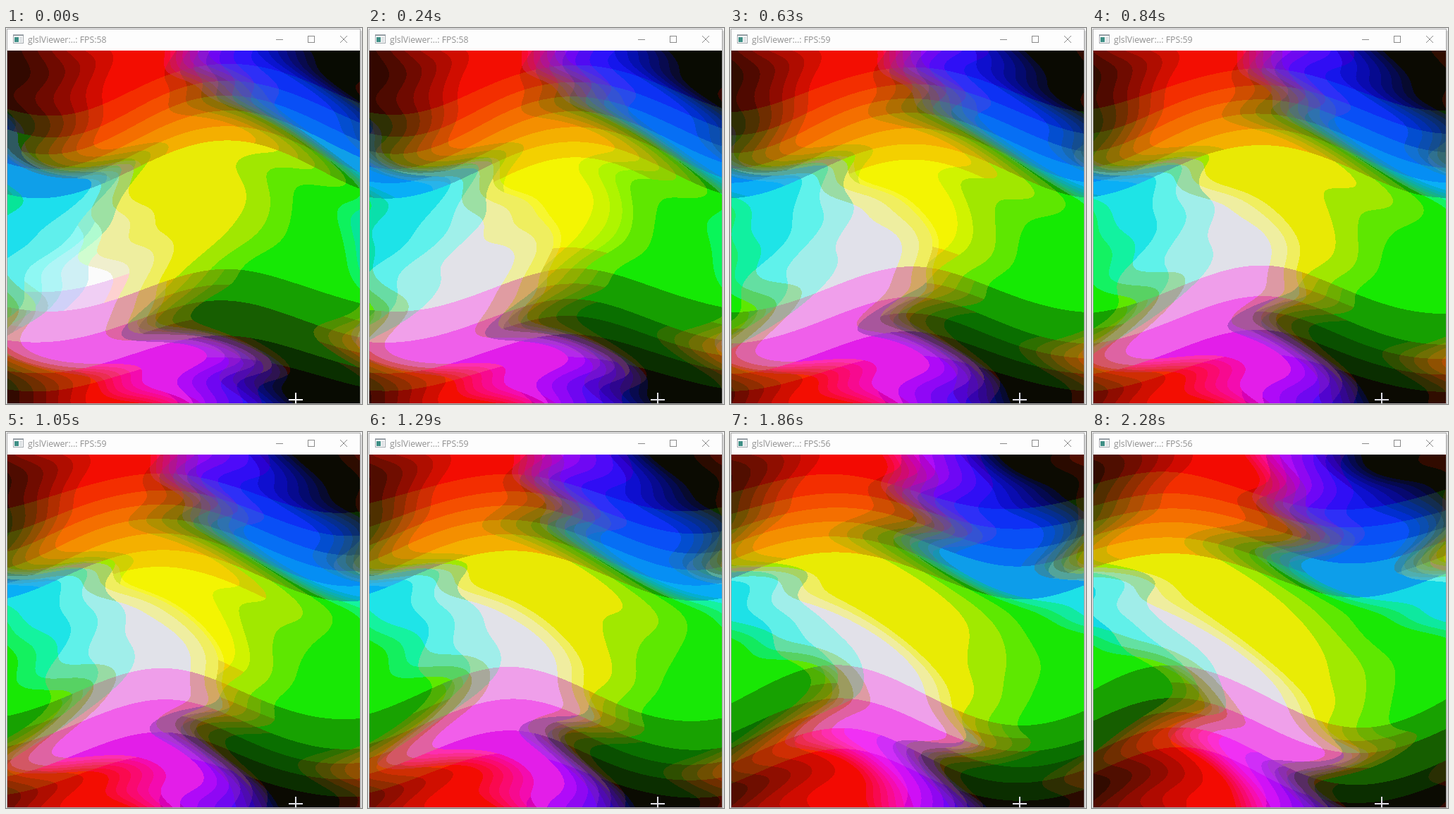
Animation, 505 px wide and 533 px high, one loop 2.38 s. Source, as an HTML page with a canvas:

```html
<!DOCTYPE html>
<html lang="en">
<head>
<meta charset="utf-8">
<title>glslViewer</title>
<style>
  html, body { margin: 0; width: 100%; height: 100%; overflow: hidden; background: #fff; }
  .stage { position: relative; width: 505px; height: 533px; overflow: hidden; background: #f3f3f3; }
  .window { position: absolute; left: 1px; top: 1px; width: 500px; height: 530px; border: 1px solid #a9a9a9; background: #fdfdfd; }
  .shade { position: absolute; left: 503px; top: 4px; width: 2px; height: 529px; background: linear-gradient(90deg, #c9c9c9, #e2e2e2); }
  .title { position: absolute; left: 31px; top: 8px; font: 12.3px/17px "Open Sans", "Noto Sans", sans-serif; color: #8f8f8f; white-space: pre; }
  svg, canvas { position: absolute; left: 0; top: 0; }
  canvas { left: 2px; top: 32px; }
</style>
</head>
<body>
<div class="stage">
  <div class="shade"></div>
  <div class="window"></div>
  <svg width="505" height="32" fill="none" stroke="#8a8a8a" shape-rendering="crispEdges">
    <rect x="10.5" y="9.5" width="14" height="12" fill="#fff" stroke="#a3a9ae"/>
    <path d="M10 10.5H25" stroke="#8b939b"/>
    <rect x="12" y="13" width="6" height="7" fill="#3f8f86" stroke="none"/>
    <path d="M19 13.5h4M19 15.5h4M19 17.5h4M19 19.5h4" stroke="#c4cbd0"/>
    <path d="M383 16.5h10M428.5 11.5h9v9h-9z"/>
    <path d="M474 11l10 10M484 11l-10 10" shape-rendering="auto"/>
  </svg>
  <div class="title">glslViewer:..: FPS:<span id="fps">58</span></div>
  <canvas id="view" width="500" height="500"></canvas>
</div>
<script>
const SIZE = 500, LOOP = 2380, MAX_COLORS = 256;
// The shader clock runs a little ahead: 62.5 ms ticks are shown for 60 ms
const START = 0.35, RATE = 62.5 / 60;
const times = [0, 90, 150, 240, 300, 390, 450, 510, 570, 630, 690, 780, 840, 930, 990, 1050,
  1110, 1200, 1290, 1380, 1440, 1500, 1560, 1650, 1740, 1800, 1860, 1950, 2040, 2100, 2190, 2280];
const titleChanges = { 0: 58, 450: 59, 1500: 56 };

const ctx = document.getElementById('view').getContext('2d');
const fpsLabel = document.getElementById('fps');

// Sine lookup keeps the per-pixel loop fast
const STEPS = 16384, SCALE = STEPS / (2 * Math.PI);
const table = Float64Array.from({ length: STEPS }, (_, i) => Math.sin((i + 0.5) / SCALE));
const sin = a => table[(a * SCALE) & (STEPS - 1)];

const keyOf = (r, g, b) => (r >> 4) << 8 | (g >> 4) << 4 | b >> 4;
const prefix = (key, depth) => key & (0x111 * (0xF << (4 - depth) & 0xF));

function onCursor(x, y) {
  return (y >= 494 && y < 496 && x >= 399 && x < 419) || (x >= 408 && x < 410 && y >= 485);
}

function warp(col, row, t) {
  let x = 6 * (col + 0.5) / SIZE, y = 6 * (SIZE - row - 0.5) / SIZE;
  for (let i = 1; i < 8; i++) {
    const phase = t + 0.3 * i;
    const dx = 0.7 / i * sin(i * y + phase) + 0.8;
    y += 0.4 / i * sin(x + phase) + 1.6;
    x += dx;
  }
  return [x, y];
}

// Octree reduction: the newest branches of the deepest level merge first
function chooseDepths(order) {
  const depth = new Map(order.map(k => [k, 4]));
  let leaves = order.length;
  for (let d = 3; d > 0 && leaves > MAX_COLORS; d--) {
    const nodes = new Map();
    for (const k of order) {
      const p = prefix(k, d);
      if (!nodes.has(p)) nodes.set(p, []);
      nodes.get(p).push(k);
    }
    for (const keys of [...nodes.values()].reverse()) {
      if (leaves <= MAX_COLORS) break;
      leaves -= new Set(keys.map(k => prefix(k, d + 1))).size - 1;
      keys.forEach(k => depth.set(k, d));
    }
  }
  return depth;
}

function buildPalette(order, sums) {
  const depth = chooseDepths(order), groups = new Map();
  const groupId = k => depth.get(k) << 12 | prefix(k, depth.get(k));
  for (const k of order) {
    const id = groupId(k);
    if (!groups.has(id)) groups.set(id, [0, 0, 0, 0]);
    const total = groups.get(id);
    for (let c = 0; c < 4; c++) total[c] += sums[k * 4 + c];
  }
  const palette = new Uint32Array(4096);
  for (const k of order) {
    const [r, g, b, n] = groups.get(groupId(k));
    palette[k] = (255 << 24 | (b / n) << 16 | (g / n) << 8 | r / n) >>> 0;
  }
  return palette;
}

function render(ms) {
  const t = START + RATE * ms / 1000;
  const keys = new Uint16Array(SIZE * SIZE), sums = new Float64Array(4096 * 4), order = [];
  const add = (r, g, b, n) => {
    const k = keyOf(r, g, b), s = k * 4;
    if (!sums[s + 3]) order.push(k);
    sums[s] += r * n;
    sums[s + 1] += g * n;
    sums[s + 2] += b * n;
    sums[s + 3] += n;
    return k;
  };
  // The title bar shares the palette whenever its text changes
  if (ms in titleChanges) {
    add(253, 253, 253, 9000);
    for (let grey = 112; grey < 240; grey += 32) {
      add(grey, grey, grey, 60);
      add(grey - 40, grey, grey, 10);
    }
  }
  for (let row = 0, i = 0; row < SIZE; row++) {
    for (let col = 0; col < SIZE; col++, i++) {
      if (onCursor(col, row)) {
        keys[i] = add(255, 255, 255, 1);
        continue;
      }
      const [x, y] = warp(col, row, t);
      const r = 127.5 * sin(x) + 128 | 0;
      const g = 127.5 * sin(y) + 128 | 0;
      const b = Math.max(0, 255 * sin(x + y) + 0.5) | 0;
      keys[i] = add(r, g, b, 1);
    }
  }
  const palette = buildPalette(order, sums);
  const image = ctx.createImageData(SIZE, SIZE);
  const out = new Uint32Array(image.data.buffer);
  for (let i = 0; i < out.length; i++) out[i] = palette[keys[i]];
  return image;
}

const cache = [];
let shown = -1;

function draw(now) {
  const ms = now % LOOP;
  const step = times.findLastIndex(start => start <= ms);
  if (step !== shown) {
    shown = step;
    cache[step] ||= render(times[step]);
    ctx.putImageData(cache[step], 0, 0);
    const changed = Object.keys(titleChanges).filter(at => at <= ms).pop();
    fpsLabel.textContent = titleChanges[changed];
  }
}

const begin = performance.now();
function tick() {
  draw(performance.now() - begin);
  requestAnimationFrame(tick);
}
tick();
</script>
</body>
</html>
```
